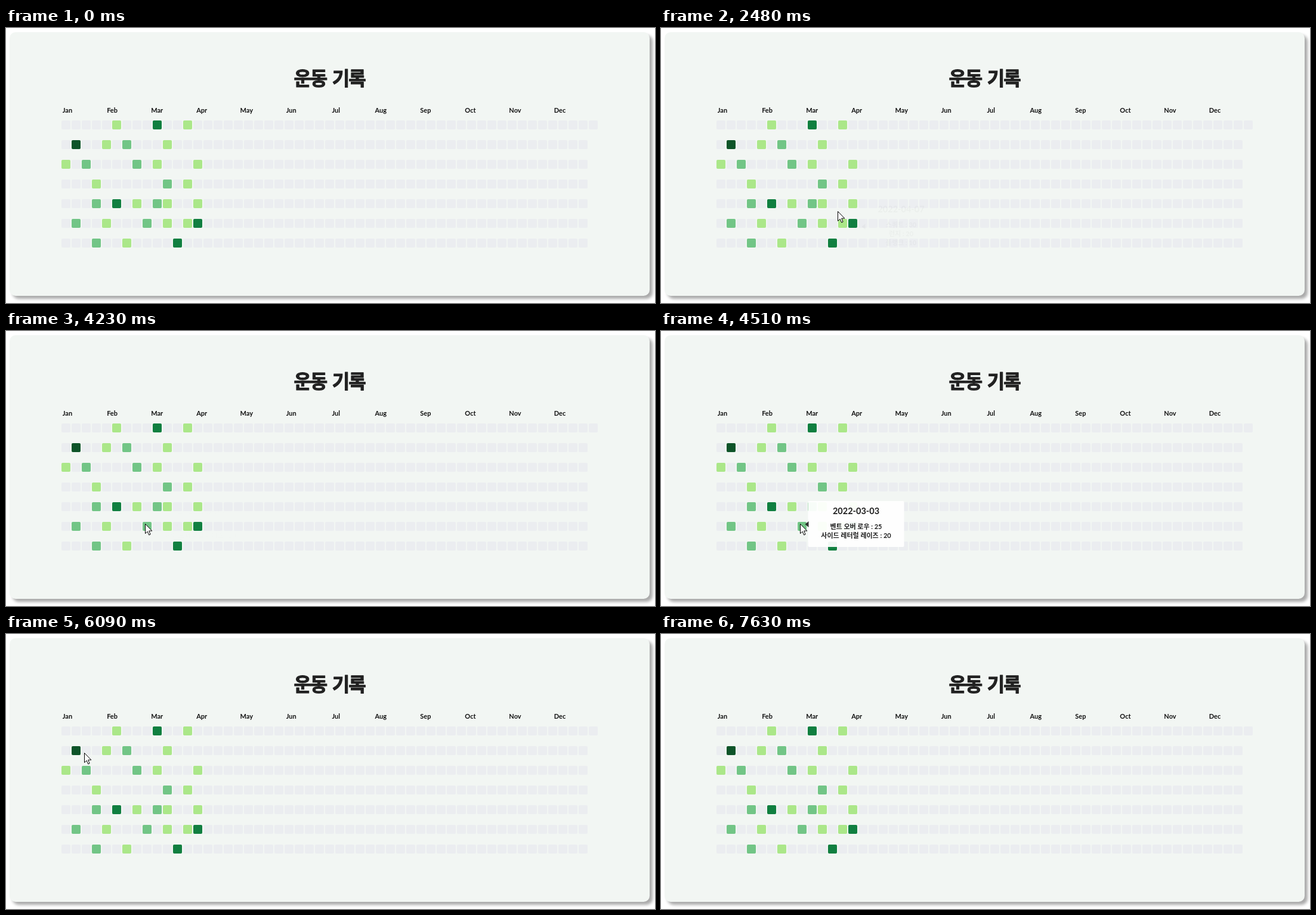
Recreate the animation shown at these times as an HTML page with a canvas. Size 1088x461 px, loop 8620 ms.

```html
<!DOCTYPE html>
<html lang="ko">
<head>
<meta charset="utf-8">
<style>
  html, body { margin: 0; overflow: hidden; background: #fff; }
  canvas { display: block; }
</style>
</head>
<body>
<canvas width="1088" height="461"></canvas>
<script>
const ctx = document.querySelector('canvas').getContext('2d');
const LOOP = 8620, FADE = 280, DAY = 864e5;
const LEFT = 93, TOP = 155, STEP_X = 17, STEP_Y = 33;
const FONT = 'Lato, "Noto Sans CJK KR", "Noto Sans CJK JP", sans-serif';
const MONTHS = 'Jan Feb Mar Apr May Jun Jul Aug Sep Oct Nov Dec'.split(' ');
const LEVELS = ['#ebedf0', '#abe789', '#72c586', '#107f40', '#0e5429'];

// One character per week: number of exercises done that day
const ROWS = [
  '.....1...3..1',
  '.4..1.2...1',
  '1.2....2.1...1',
  '...1......2.1',
  '...2.3.1.21..1',
  '.2..1...2.1.13',
  '...2..1....3',
];

// Where the cursor rests, and the tooltip that fades in there
const STOPS = [
  { x: 997, y: 447, arrive: 330, leave: 330 },
  { x: 328, y: 332, arrive: 1250, shown: 1610, leave: 2210,
    lines: ['스쿼트 : 30', '런지 : 20', '플랭크 : 10'] },
  { x: 269, y: 298, arrive: 2710, shown: 2890, leave: 3830,
    lines: ['스쿼트 : 15'] },
  { x: 233, y: 323, arrive: 4230, shown: 4510, leave: 5430, alpha: 0.94,
    lines: ['벤트 오버 로우 : 25', '사이드 레터럴 레이즈 : 20'] },
  { x: 122, y: 197, arrive: 6150, shown: 6570, leave: 7290,
    lines: ['스쿼트 : 20', '덤벨 숄더 프레스 : 20', '런지 : 15', '플랭크 : 10'] },
  { x: 117, y: 461, arrive: 7630, leave: 7630 },
];

const ramp = (t, from, to) => Math.min(1, Math.max(0, (t - from) / (to - from)));
const mix = (a, b, k) => Math.round(a + (b - a) * k);

function box(x, y, w, h, r, color) {
  ctx.fillStyle = color;
  ctx.beginPath();
  ctx.roundRect(x, y, w, h, r);
  ctx.fill();
}

function poly(points, color) {
  ctx.fillStyle = color;
  ctx.beginPath();
  points.forEach(([x, y]) => ctx.lineTo(x, y));
  ctx.closePath();
  ctx.fill();
}

function setFont(size) {
  ctx.font = `700 ${size}px ${FONT}`;
}

function text(str, x, y, size) {
  setFont(size);
  ctx.fillStyle = '#111';
  ctx.fillText(str, x, y);
}

function textWidth(str, size) {
  setFont(size);
  return ctx.measureText(str).width;
}

function drawTitle() {
  ctx.save();
  ctx.font = `900 32px ${FONT}`;
  ctx.letterSpacing = '-2px';
  ctx.wordSpacing = '4px';
  ctx.fillStyle = ctx.strokeStyle = '#212121';
  ctx.lineJoin = 'round';
  ctx.fillText('운동 기록', 542, 96);
  ctx.strokeText('운동 기록', 542, 96);
  ctx.restore();
}

function drawChart() {
  ctx.fillStyle = '#fff';
  ctx.fillRect(0, 0, 1088, 461);
  ctx.save();
  ctx.shadowColor = '#aaa';
  ctx.shadowBlur = 5;
  ctx.shadowOffsetX = ctx.shadowOffsetY = 5;
  box(6, 7, 1073, 442, 10, '#f2f6f3');
  ctx.restore();

  ctx.textAlign = 'center';
  drawTitle();
  MONTHS.forEach((month, i) => text(month, 103 + 75.05 * i, 142, 11));

  ROWS.forEach((row, r) => {
    const weeks = r ? 52 : 53;
    for (let c = 0; c < weeks; c++) {
      box(LEFT + STEP_X * c, TOP + STEP_Y * r, 15, 15, 2, LEVELS[+row[c] || 0]);
    }
  });
}

function dateAt(x, y) {
  const week = Math.floor((x - LEFT) / STEP_X);
  const day = Math.floor((y - TOP) / STEP_Y);
  return new Date(Date.UTC(2022, 0, 1) + (7 * week + day) * DAY).toISOString().slice(0, 10);
}

function drawTip({ x, y, shown, leave, lines, alpha = 1 }, t) {
  const opacity = alpha * ramp(t, shown - FADE, shown) * (1 - ramp(t, leave, leave + FADE));
  if (!opacity) return;
  const n = lines.length, date = dateAt(x, y);
  const widest = Math.max(textWidth(date, 14.5), ...lines.map(line => textWidth(line, 11)));
  const w = Math.round(widest + 44), h = n > 1 ? 47 + 15 * n : 59;
  const left = x + 13.5, mid = left + w / 2;
  const top = Math.round(y - h / 2 + 0.5);

  ctx.globalAlpha = opacity;
  box(left, top, w, h, 2, '#fff');
  poly([[x + 8.5, y + 1], [left + 1, y - 4], [left + 1, y + 6]], '#222');
  text(date, mid, top + 22, 14.5);
  lines.forEach((line, i) => text(line, mid, top + h - 15 * (n - i), 11));
  ctx.globalAlpha = 1;
}

function drawCursor(t) {
  const i = STOPS.findIndex(stop => t < stop.leave);
  if (i < 1) return;
  const from = STOPS[i - 1], to = STOPS[i];
  const k = ramp(t, from.leave, to.arrive);
  ctx.save();
  // Vertical travel settles earlier than horizontal
  ctx.translate(mix(from.x, to.x, k) + 0.5, mix(from.y, to.y, 1 - (1 - k) ** 1.7) + 0.5);
  poly([[0, 0], [0, 16], [3.7, 12.7], [6.2, 18.5], [8.6, 17.5], [6.2, 11.6], [11.3, 11.6]], '#fff');
  ctx.strokeStyle = '#000';
  ctx.stroke();
  ctx.restore();
}

function frame(now) {
  const t = now % LOOP;
  drawChart();
  STOPS.filter(stop => stop.lines).forEach(stop => drawTip(stop, t));
  drawCursor(t);
  requestAnimationFrame(frame);
}
requestAnimationFrame(frame);
</script>
</body>
</html>
```
